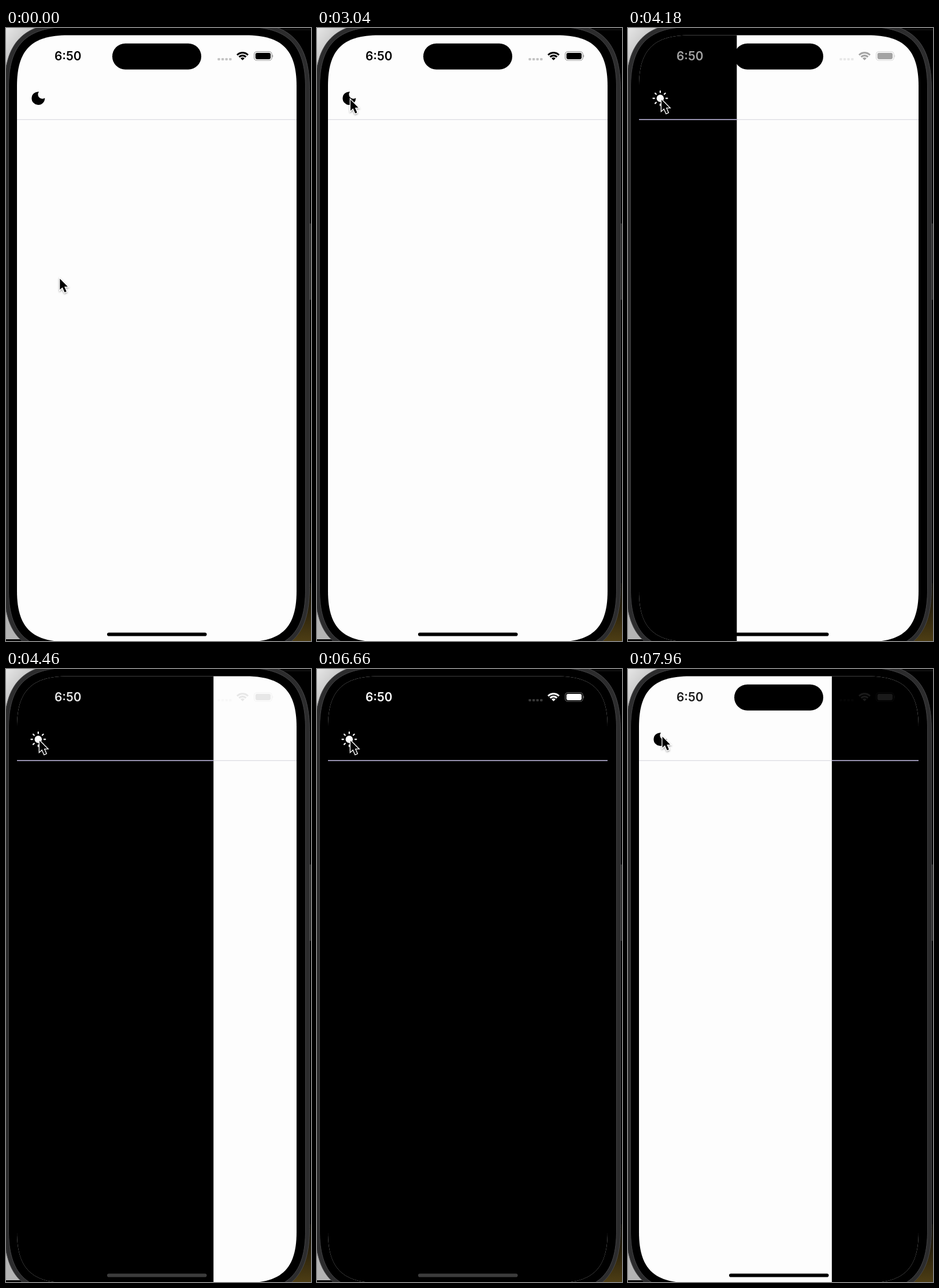
These frames come from a looping animation (528x1060 px, 8 s). An HTML page:

```html
<!DOCTYPE html>
<html lang="en">
<head>
<meta charset="utf-8">
<title>Theme wipe</title>
<style>
  html, body { margin: 0; width: 100%; height: 100%; overflow: hidden; background: #000; }
  svg { display: block; width: 100vw; height: 100vh; }
  text { font: 600 20.8px Inter, Roboto, sans-serif; }
</style>
</head>
<body>
<svg viewBox="0 0 528 1060">
  <defs>
    <linearGradient id="paper" x1="0" y1="0" x2="1" y2="1">
      <stop offset="0" stop-color="#e6e6e6"/>
      <stop offset="1" stop-color="#9a9a9a"/>
    </linearGradient>
    <linearGradient id="dusk" x1="0" y1="0" x2="0" y2="1">
      <stop offset="0" stop-color="#0c0a05"/>
      <stop offset="1" stop-color="#4d3d14"/>
    </linearGradient>
    <clipPath id="screen"><path id="screenShape"/></clipPath>
    <clipPath id="wipe"><rect id="wipeBox" y="0" height="1060"/></clipPath>
    <filter id="shadow" x="-50%" y="-50%" width="200%" height="200%">
      <feDropShadow dx="0" dy="1.5" stdDeviation="1.5" flood-opacity=".4"/>
    </filter>
  </defs>

  <!-- desktop behind the phone -->
  <rect width="528" height="1060" fill="#000"/>
  <rect width="60" height="75" fill="url(#paper)"/>
  <rect y="975" width="50" height="82" fill="#b4b4b4"/>
  <rect x="470" y="2.5" width="58" height="1" fill="#222"/>
  <rect x="470" y="960" width="58" height="100" fill="url(#dusk)"/>
  <rect x="525" y="338" width="2.5" height="132" fill="#3c3c3c"/>

  <!-- phone body -->
  <path id="rim" fill="#2c2c2d" stroke="#48484a"/>
  <path id="body" fill="#000" stroke="#434345"/>

  <g clip-path="url(#screen)">
    <rect width="528" height="1062" fill="#fdfdfd"/>
    <rect x="19" y="157.8" width="484" height="1.2" fill="#d9d9e1"/>
    <path d="M57 110.2A7.5 7.5 0 0 0 67.2 121A11.4 11.4 0 1 1 57 110.2Z"/>
  </g>
  <g clip-path="url(#wipe)">
    <g clip-path="url(#screen)">
      <rect width="528" height="1062" fill="#000"/>
      <rect x="19" y="157.6" width="484" height="1.5" fill="#c9c2ea"/>
      <g id="sun" transform="translate(55.8 121.6)" fill="#fff" stroke="#fff" stroke-width="2.2" stroke-linecap="round">
        <circle r="6.3" stroke="none"/>
      </g>
    </g>
  </g>

  <!-- status bar -->
  <rect x="184" y="26.7" width="154" height="45" rx="22.5"/>
  <g id="status">
    <text x="84" y="56">6:50</text>
    <g id="dots" opacity=".22"></g>
    <g id="wifi"></g>
    <rect x="429.6" y="40.8" width="30.6" height="15.2" rx="4.6" fill="none" stroke="currentColor" stroke-width="1.2" opacity=".4"/>
    <rect x="431.8" y="42.9" width="26.3" height="11" rx="2.8"/>
    <path d="M461.2 46Q463.6 48.4 461.2 50.9Z" opacity=".45"/>
  </g>
  <rect id="home" x="175" y="1045.4" width="172.5" height="6.2" rx="3.1"/>

  <g filter="url(#shadow)">
    <path id="cursor" d="M0 0V19L4.4 15L8.2 23.6L11.4 22.2L7.7 13.8H13.6Z" stroke="#fff" stroke-width="2.6" paint-order="stroke"/>
  </g>
</svg>
<script>
const LOOP = 8000, LEFT = 19, WIDTH = 484;
const $ = id => document.getElementById(id);
const clamp = v => Math.min(1, Math.max(0, v));
const lerp = (a, b, k) => a + (b - a) * k;
const inOutCubic = x => x < .5 ? 4 * x ** 3 : 1 - 4 * (1 - x) ** 3;
const gray = v => `rgb(${v},${v},${v})`;

function add(parent, tag, attrs) {
  const el = document.createElementNS('http://www.w3.org/2000/svg', tag);
  for (const key in attrs) el.setAttribute(key, attrs[key]);
  return parent.appendChild(el);
}

// Rectangle with smooth, continuous corners
function squircle(l, t, r, b, e) {
  const h = e * .288;
  return `M${l} ${t + e}C${l} ${t + h} ${l + h} ${t} ${l + e} ${t}H${r - e}` +
    `C${r - h} ${t} ${r} ${t + h} ${r} ${t + e}V${b - e}` +
    `C${r} ${b - h} ${r - h} ${b} ${r - e} ${b}H${l + e}` +
    `C${l + h} ${b} ${l} ${b - h} ${l} ${b - e}Z`;
}
$('screenShape').setAttribute('d', squircle(LEFT, 12.6, LEFT + WIDTH, 1061.5, 88));
$('body').setAttribute('d', squircle(4.5, -2, 518.5, 1076, 106));
$('rim').setAttribute('d', squircle(-3, -9.5, 525.5, 1083.5, 116));

for (let i = 0; i < 8; i++)
  add($('sun'), 'path', { d: 'M0 -10V-12.4', transform: `rotate(${i * 45})` });
for (let i = 0; i < 4; i++)
  add($('dots'), 'rect', { x: 366.3 + i * 6.6, y: 52, width: 4.4, height: 4, rx: 1.2 });

// Wi-Fi: three slices of a fan
function fan(inner, outer) {
  const a = 46 * Math.PI / 180, s = Math.sin(a), c = Math.cos(a), x = 409.5, y = 55.8;
  const d = `M${x - outer * s} ${y - outer * c}A${outer} ${outer} 0 0 1 ${x + outer * s} ${y - outer * c}` +
    `L${x + inner * s} ${y - inner * c}A${inner} ${inner} 0 0 0 ${x - inner * s} ${y - inner * c}Z`;
  add($('wifi'), 'path', { d });
}
[[11.6, 14.6], [6.6, 9.8], [0.01, 4.8]].forEach(([a, b]) => fan(a, b));

// Ticks come in threes: one held 100 ms, then two of 20 ms
function tickAt(t) {
  const group = Math.floor((t - 1800) / 140), phase = t - 1800 - group * 140;
  return group * 3 + (phase < 100 ? 0 : phase < 120 ? 1 : 2);
}

const statusFade = x => 1 - (1 - clamp((x - .25) / .45)) ** 1.8;

function draw(t) {
  const tick = tickAt(t);
  const toDark = clamp((tick - 31.38) / 44.2), toLight = clamp((tick - 107.05) / 43.5);
  const darkEdge = inOutCubic(toDark), lightEdge = inOutCubic(toLight);

  const from = toLight > 0 ? LEFT + WIDTH * lightEdge : 0;
  const to = toDark > 0 ? LEFT + WIDTH * darkEdge : 0;
  $('wipeBox').setAttribute('x', from);
  $('wipeBox').setAttribute('width', Math.max(0, to - from));

  const tone = gray(Math.round(255 * (statusFade(toDark) - statusFade(toLight))));
  $('status').setAttribute('fill', tone);
  $('status').setAttribute('color', tone);
  const bar = clamp((darkEdge - .4) / .2) - clamp((lightEdge - .4) / .2);
  $('home').setAttribute('fill', gray(Math.round(60 * bar)));

  const time = 1800 + tick * 140 / 3;
  const left = 1 - inOutCubic(clamp((time - 402) / 1860));
  const drift = clamp((tick - 126) / 6) ** 2;
  const x = 58 + 35.3 * left ** .93 + 1.5 * drift;
  const y = lerp(124, 433.5, left) - 7 * drift;
  $('cursor').setAttribute('transform', `translate(${x} ${y})`);
}

const start = performance.now();
function loop() {
  draw((performance.now() - start) % LOOP);
  requestAnimationFrame(loop);
}
draw(0);
requestAnimationFrame(loop);
</script>
</body>
</html>
```
